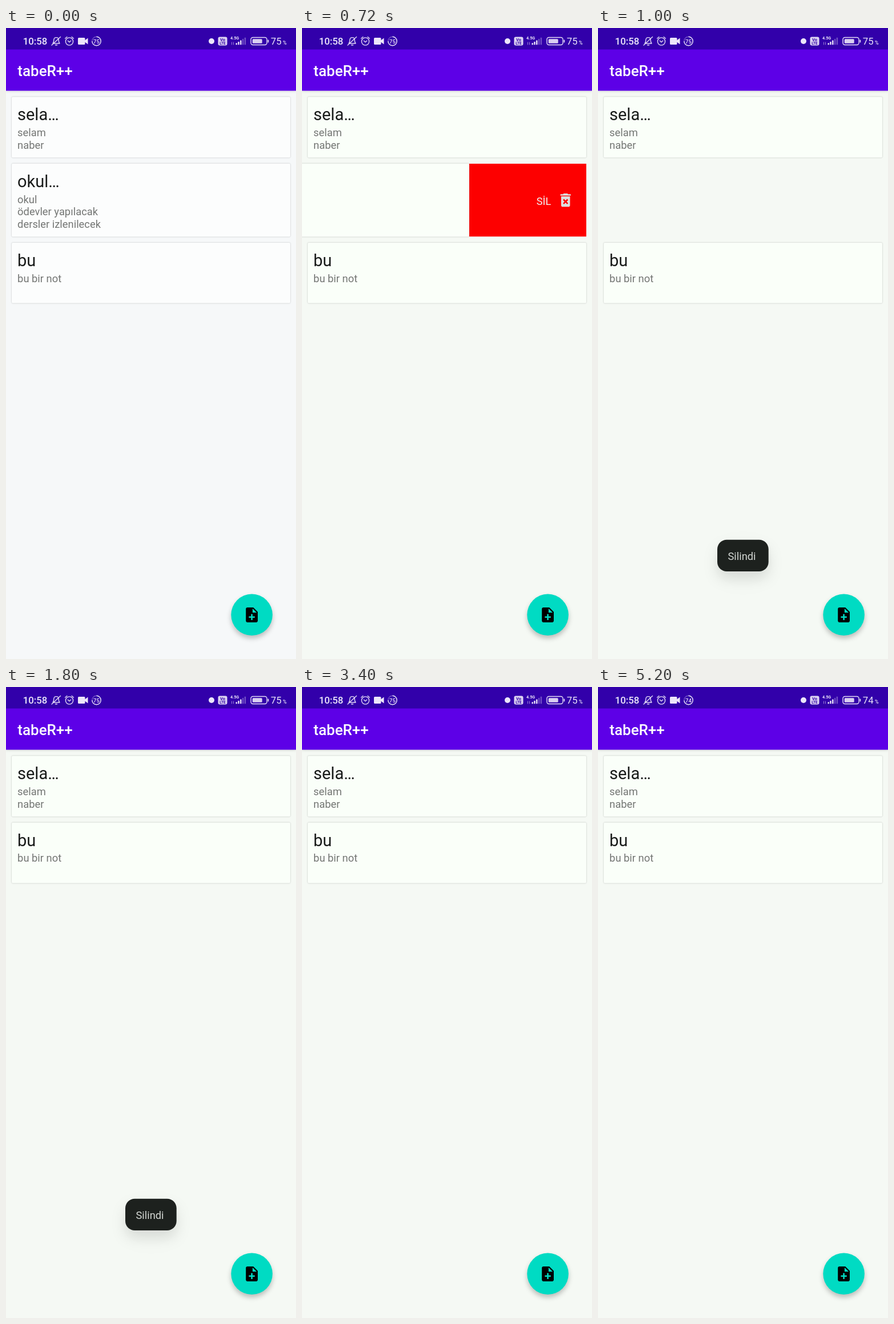
Animation, 508 px wide and 1102 px high, one loop 5240 ms. Source, as an HTML page:

```html
<!DOCTYPE html>
<html lang="tr">
<head>
<meta charset="utf-8">
<title>Notlar</title>
<style>
  html, body { margin: 0; width: 100%; height: 100%; overflow: hidden; background: #f5f8f5; }
  svg { display: block; width: 100vw; height: 100vh; font-family: Roboto, sans-serif; }
  .bar { filter: drop-shadow(0 1.5px 2px rgba(0,0,0,.13)); }
  .card { filter: drop-shadow(0 .8px 1.2px rgba(0,0,0,.25)); }
  .title { font-size: 29px; fill: #191b1a; }
  .body { font-size: 18.35px; fill: #747674; }
  .fab { filter: drop-shadow(0 5px 4px rgba(0,0,0,.24)); }
  .toast { filter: drop-shadow(0 13px 12px rgba(0,0,0,.11)) drop-shadow(0 12px 22px rgba(0,0,0,.02)); }
  .line { fill: none; stroke: #e4dcf6; stroke-width: 1.4; stroke-linecap: round; stroke-linejoin: round; }
  .status { fill: #ece6fa; font-weight: 500; }
</style>
</head>
<body>
<svg viewBox="0 0 508 1102" preserveAspectRatio="none">
  <defs>
    <clipPath id="clip"><rect id="clipBox" y="237" height="127.4"/></clipPath>
  </defs>
  <rect id="page" width="508" height="1102"/>

  <g clip-path="url(#clip)">
    <rect x="-10" y="237" width="508" height="127.4" fill="#fd0000"/>
    <text x="410.8" y="309" font-size="18.2" fill="#f3eeee">SİL</text>
    <path transform="translate(446.1 285) scale(1.3)" fill="#dedede" d="M6 19c0 1.1.9 2 2 2h8c1.1 0 2-.9 2-2V7H6v12zm2.46-7.12l1.41-1.41L12 12.59l2.12-2.12 1.41 1.41L13.41 14l2.12 2.12-1.41 1.41L12 15.41l-2.12 2.12-1.41-1.41L10.59 14l-2.13-2.12zM15.5 4l-1-1h-5l-1 1H5v2h14V4z"/>
  </g>
  <g id="cards"></g>

  <rect class="bar" width="508" height="109.6" fill="#5d00e7"/>
  <rect width="508" height="37.5" fill="#3200aa"/>
  <text x="20.3" y="84" font-size="26" font-weight="500" fill="#fff">tabeR++</text>

  <g class="status">
    <text x="29.8" y="29" font-size="16.8">10:58</text>
    <g class="line">
      <path d="M82 27h12c-1.6-1.6-1.8-3-1.8-5.4 0-3-1.6-5-4.2-5s-4.300 2-4.300 5c0 2.400-.2 3.800-1.700 5.400M86.500 29.800h3M80 30L95.500 15.500"/>
      <circle cx="111" cy="23.5" r="6.600"/>
      <path d="M103.700 18.300l3.200-2.800M118.300 18.300l-3.200-2.800M108.300 22.300l2.700 2.500 2.700-2.500"/>
      <circle cx="158.500" cy="23" r="7.700" stroke-opacity=".35"/>
      <circle id="ring" cx="158.500" cy="23" r="7.700" pathLength="100" stroke-linecap="butt" transform="rotate(-90 158.500 23)"/>
    </g>
    <path d="M127.500 17h9.500q1.500 0 1.500 1.500v2.700l5-3.700v11l-5-3.700v2.700q0 1.500-1.500 1.500h-9.500q-1.500 0-1.500-1.500v-9q0-1.500 1.500-1.500z"/>
    <text id="small" x="158.500" y="26.500" font-size="9.500" text-anchor="middle"></text>

    <circle cx="360" cy="23" r="5"/>
    <rect x="371.500" y="15.500" width="16" height="15" rx="3" fill="#dcd3f2"/>
    <g fill="#3200aa" font-weight="700" text-anchor="middle">
      <text x="379.500" y="22.500" font-size="7.500">Vo</text>
      <text x="379.500" y="29" font-size="6.500">LTE</text>
    </g>
    <text x="393" y="20" font-size="7.200" font-weight="700">4.5G</text>
    <path class="line" stroke-opacity=".6" style="stroke-width:1" d="M395.500 25v4M398.500 25v4"/>
    <g id="signal"></g>
    <rect class="line" x="429" y="16.500" width="28" height="13" rx="3.500"/>
    <rect x="431.700" y="19.200" width="17" height="7.600" rx="1.500" fill="#d9cff1"/>
    <rect x="458.500" y="20.500" width="1.700" height="5" rx=".8"/>
    <text id="level" x="463.800" y="29" font-size="16.800" font-weight="400"></text>
    <text x="485" y="29" font-size="9">%</text>
  </g>

  <circle class="fab" cx="430.600" cy="1024.800" r="36.300" fill="#00dbc3"/>
  <path transform="translate(415 1009.300) scale(1.3)" d="M14 2H6c-1.100 0-1.990.9-1.990 2L4 20c0 1.100.89 2 1.990 2H18c1.100 0 2-.9 2-2V8l-6-6zm2 14h-3v3h-2v-3H8v-2h3v-3h2v3h3v2zm-3-7V3.500L18.500 9H13z"/>

  <g id="toast">
    <rect class="toast" x="209" y="893.700" width="89.700" height="55.400" rx="16.500" fill="#1d211e"/>
    <text x="227.500" y="928.600" font-size="18.250" fill="#d3d7d3">Silindi</text>
  </g>
</svg>
<script>
  const LOOP = 5240, STEP = 40;
  const notes = [
    { y: 120.3, h: 106, title: 'sela…', lines: ['selam', 'naber'] },
    { y: 236.8, h: 127.6, title: 'okul…', lines: ['okul', 'ödevler yapılacak', 'dersler izlenilecek'] },
    { y: 374.9, h: 105.7, title: 'bu', lines: ['bu bir not'] }
  ];
  const $ = id => document.getElementById(id);
  const make = (tag, attrs, parent, text = '') => {
    const el = document.createElementNS('http://www.w3.org/2000/svg', tag);
    for (const key in attrs) el.setAttribute(key, attrs[key]);
    el.textContent = text;
    return parent.appendChild(el);
  };
  const ramp = (t, a, b) => Math.min(1, Math.max(0, (t - a) / (b - a)));
  const smooth = p => (1 - Math.cos(Math.PI * p)) / 2;
  const mix = (a, b, p) => `rgb(${a.map((v, i) => Math.round(v + (b[i] - v) * p))})`;

  const cards = notes.map(n => {
    const g = make('g', {}, $('cards'));
    const box = make('rect', { class: 'card', x: 10, y: n.y, width: 488, height: n.h, rx: 2 }, g);
    make('text', { class: 'title', x: 20, y: n.y + 41 }, g, n.title);
    n.lines.forEach((s, i) =>
      make('text', { class: 'body', x: 20.1, y: n.y + 68.7 + i * 21.6 }, g, s));
    return { g, box };
  });

  for (let i = 0; i < 5; i++) {
    const h = 3 + i * 2.4;
    make('rect', { x: 402.5 + i * 3.8, y: 29.3 - h, width: 2.4, height: h, rx: 0.6,
      'fill-opacity': i < 3 ? 1 : 0.35 }, $('signal'));
  }

  function draw(t) {
    const tint = ramp(t, 400, 720);
    $('page').setAttribute('fill', mix([246, 248, 249], [245, 249, 244], tint));
    const paper = mix([252, 253, 253], [250, 255, 249], tint);
    cards.forEach(c => c.box.setAttribute('fill', paper));

    // the finger drags the second note, then it flies off and the gap closes
    const drag = 108 * Math.pow(ramp(t, 520, 640), 1.5);
    const swipe = drag + 400 * smooth(ramp(t, 640, 884));
    const gone = t >= 884;
    cards[1].g.setAttribute('transform', `translate(${-swipe} 0)`);
    cards[1].g.setAttribute('visibility', gone ? 'hidden' : 'visible');
    $('clipBox').setAttribute('x', 498 - swipe);
    $('clipBox').setAttribute('width', gone ? 0 : swipe);
    cards[2].g.setAttribute('transform', `translate(0 ${-138.1 * smooth(ramp(t, 1060, 1310))})`);

    const alpha = ramp(t, 880, 980) * (1 - ramp(t, 2880, 3060));
    $('toast').setAttribute('opacity', alpha);
    $('toast').setAttribute('visibility', alpha ? 'visible' : 'hidden');

    const level = t < 4840 ? 75 : 74;
    $('level').textContent = $('small').textContent = level;
    $('ring').setAttribute('stroke-dasharray', `${level} 100`);
  }

  const start = performance.now();
  function tick() {
    const t = (performance.now() - start + 1) % LOOP;
    draw(Math.floor(t / STEP) * STEP);
    requestAnimationFrame(tick);
  }
  draw(0);
  requestAnimationFrame(tick);
</script>
</body>
</html>
```
